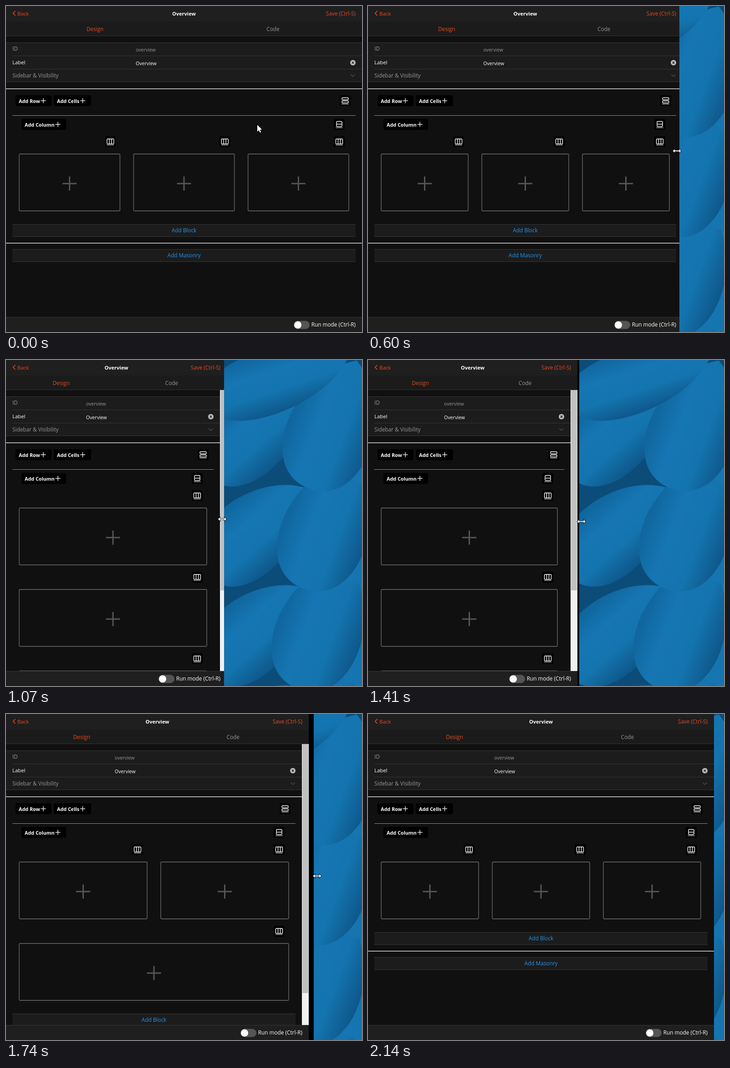
Recreate the animation shown at these times as an HTML page with a canvas. Size 782 by 716 pixels, loop 2.21 s.

```html
<!DOCTYPE html>
<html lang="en">
<head>
<meta charset="utf-8">
<title>Responsive layout editor</title>
<style>
html, body { margin: 0; width: 100%; height: 100%; overflow: hidden; background: #111; }
canvas { display: block; }
</style>
</head>
<body>
<canvas id="stage" width="782" height="716"></canvas>
<script>
const ctx = document.getElementById('stage').getContext('2d');
const LOOP = 2210, STEP = 67, WIDTH = 782, HEIGHT = 716;
const BODY_TOP = 66, BODY_BOTTOM = 683, ROW_PITCH = 179;
const MIN_PANEL = 450, END_PANEL = 760;
const ORANGE = '#e64a20', BLUE = '#2196f3', GREY = '#979797', BAR = '#1c1c1c', RULE = '#363636';

const clamp = v => Math.min(1, Math.max(0, v));
const smooth = v => (v = clamp(v)) * v * (3 - 2 * v);
const mix = (a, b, p) => a + (b - a) * p;

// The panel is dragged narrow at a nearly steady pace, rests, then eases wide again.
function panelWidth(step) {
  if (step > 20) return mix(MIN_PANEL, END_PANEL, smooth((step - 20) / 9.5));
  const drag = [[7, WIDTH], [9, 691], [16, 485], [17.3, 454], [19, MIN_PANEL]];
  return drag.slice(1).reduce((w, [end, to], i) => {
    const [start, from] = drag[i];
    return w + (to - from) * clamp((step - start) / (end - start));
  }, WIDTH);
}

function cursorAt(step) {
  const y = 356 - 95 * Math.exp(-((step / 9.4) ** 1.85));
  if (step < 7) return [mix(552, WIDTH, smooth(step / 7)), y];
  return [panelWidth(step + 0.42) + 25 * Math.max(0, step - 29.5), y];
}

function rect(x, y, w, h, color) {
  ctx.fillStyle = color;
  ctx.fillRect(x, y, w, h);
}

function text(str, x, y, color, { size = 11.8, weight = 400, align = 'left' } = {}) {
  ctx.font = `${weight} ${size}px "Open Sans", "Noto Sans", sans-serif`;
  ctx.textAlign = align;
  ctx.fillStyle = color;
  ctx.fillText(str, x, y);
}

function stroke(points, color, width = 1) {
  ctx.beginPath();
  points.forEach(([x, y]) => ctx.lineTo(x, y));
  ctx.strokeStyle = color;
  ctx.lineWidth = width;
  ctx.stroke();
}

function pill(x, y, w, h, r, color) {
  ctx.beginPath();
  ctx.roundRect(x, y, w, h, r);
  ctx.fillStyle = color;
  ctx.fill();
}

function frame(x, y, w, h, r, color, width) {
  ctx.beginPath();
  ctx.roundRect(x, y, w, h, r);
  ctx.strokeStyle = color;
  ctx.lineWidth = width;
  ctx.stroke();
}

function disc(x, y, r, color) {
  ctx.beginPath();
  ctx.arc(x, y, r, 0, 7);
  ctx.fillStyle = color;
  ctx.fill();
}

function plus(x, y, r, color, width) {
  rect(x - r, y - width / 2, r * 2, width, color);
  rect(x - width / 2, y - r, width, r * 2, color);
}

function feather(tipX, tipY, angle, length, width) {
  const side = width * 0.67;
  const fill = ctx.createLinearGradient(-width / 2, 0, width / 2, 0);
  ['#10659c', '#1676b3', '#1474ae', '#0e578a'].forEach((c, i) => fill.addColorStop(i / 3, c));
  ctx.save();
  ctx.translate(tipX, tipY);
  ctx.rotate(angle);
  ctx.beginPath();
  ctx.moveTo(0, -length);
  ctx.bezierCurveTo(side, -length * 0.75, side, 0, 0, 0);
  ctx.bezierCurveTo(-side, 0, -side, -length * 0.75, 0, -length);
  ctx.fillStyle = fill;
  ctx.fill();
  ctx.restore();
}

// Overlapping rows of soft feathers, the upper rows on top
function wallpaper() {
  rect(0, 0, WIDTH, HEIGHT, '#0c4c79');
  for (let row = 3; row >= 0; row--) {
    const y = 282 + 220 * row;
    feather(440, y - 30, 0.85, 290, 170);
    feather(785 - 10 * row, y - 10, 0.2, 270, 150);
    feather(665 - 12 * row, y, 0.36, 300, 190);
  }
  feather(440, 95, 1.25, 330, 140);
}

function iconBase(x, y) {
  pill(x - 12, y - 12, 24, 24, 4, '#000');
  rect(x - 8, y + 7, 16, 1, '#ddd');
}

function columnsIcon(x, y) {
  iconBase(x, y);
  frame(x - 7.5, y - 6, 15, 11, 1.5, '#fff', 1.4);
  for (const dx of [-2.5, 2.5]) stroke([[x + dx, y - 6], [x + dx, y + 5]], '#fff', 1.4);
}

function rowsIcon(x, y) {
  iconBase(x, y);
  for (const dy of [-6.5, 0.5]) frame(x - 7, y + dy, 14, 4.5, 1.5, '#fff', 1.4);
}

function cellIcon(x, y) {
  iconBase(x, y);
  frame(x - 6, y - 6.5, 12, 11.5, 2, '#fff', 1.4);
  stroke([[x - 6, y - 0.5], [x + 6, y - 0.5]], '#fff', 1.4);
}

function addButton(label, x, y, w, plusX) {
  pill(x, y, w, 24, 4, '#000');
  text(label, x + 7, y + 17, '#fff', { size: 10.8, weight: 700 });
  plus(plusX, y + 12, 5.5, '#eee', 1.4);
}

function linkBar(label, y, width) {
  rect(14, y, width - 28, 28, BAR);
  for (const dy of [0, 27]) rect(14, y + dy, width - 28, 1, RULE);
  text(label, width / 2, y + 18, BLUE, { align: 'center' });
}

function header(width) {
  rect(0, 0, width, 34, '#1f1f1f');
  rect(0, 34, width, 32, '#1b1b1b');
  rect(0, 65, width, 1, '#353535');
  stroke([[20.5, 11], [15.5, 16], [20.5, 21]], ORANGE, 1.6);
  text('Back', 25, 21, ORANGE, { size: 11.5 });
  text('Overview', width / 2, 21, '#fff', { size: 11, weight: 700, align: 'center' });
  text('Save (Ctrl-S)', width - 14, 21, ORANGE, { align: 'right' });
  text('Design', width / 4, 55, ORANGE, { align: 'center' });
  text('Code', width * 0.75, 55, GREY, { align: 'center' });
}

function settings(width) {
  const valueX = width * 0.35 + 11.3;
  rect(0, 80, width, 87, BAR);
  for (const y of [80, 166]) rect(0, y, width, 1, RULE);
  for (const y of [109, 138]) rect(14, y, width - 14, 1, RULE);
  text('ID', 14, 98, GREY);
  text('overview', valueX, 100, GREY, { size: 10.6 });
  text('Label', 14, 128, '#fff', { size: 11.4 });
  text('Overview', valueX, 129.5, '#fff', { size: 10.6 });
  text('Sidebar & Visibility', 14, 157, GREY);

  const x = width - 20;
  disc(x, 124.5, 6, '#bbb');
  for (const d of [-2.2, 2.2]) stroke([[x - d, 122.3], [x + d, 126.7]], '#222', 1.4);
  stroke([[x - 4.5, 150.5], [x, 155], [x + 4.5, 150.5]], '#555', 1.2);
}

function cell(x, y, w) {
  columnsIcon(x + w - 22, y - 26);
  frame(x + 1, y + 1, w - 2, 125, 2.5, '#565656', 1.8);
  plus(x + w / 2, y + 66, 15.5, '#565656', 3);
}

function editor(width, columns) {
  rect(0, 181, width, 1.5, '#dedede');
  addButton('Add Row', 21, 196, 79, 82);
  addButton('Add Cells', 105, 196, 82, 168.5);
  rowsIcon(width - 37, 208);
  rect(14, 240, width - 28, 1, '#929292');
  addButton('Add Column', 34, 248, 98, 114);
  cellIcon(width - 50, 260);

  for (let i = 0; i < 3; i++) {
    const row = Math.floor(i / columns);
    const inRow = Math.min(columns, 3 - row * columns);
    const w = (width - 28 * (inRow + 1)) / inRow;
    cell(28 + (i % columns) * (w + 28), 324 + row * ROW_PITCH, w);
  }

  const shift = (Math.ceil(3 / columns) - 1) * ROW_PITCH;
  linkBar('Add Block', 479 + shift, width);
  rect(0, 520 + shift, width, 1.5, '#dedede');
  linkBar('Add Masonry', 534 + shift, width);
}

function scrollbar(x, columns) {
  const thumbEnd = columns === 2 ? 613 : 506;
  rect(x, BODY_TOP, 15, BODY_BOTTOM - BODY_TOP, '#f1f1f1');
  rect(x + 1, BODY_TOP, 13, thumbEnd - BODY_TOP, '#c1c1c1');
}

function footer(width) {
  rect(0, BODY_BOTTOM, width, HEIGHT - BODY_BOTTOM, '#1f1f1f');
  rect(0, BODY_BOTTOM, width, 1, '#353535');
  pill(width - 150, 691.5, 35, 18, 9, '#555');
  disc(width - 141, 700.5, 8, '#fff');
  text('Run mode (Ctrl-R)', width - 14, 704, '#fff', { align: 'right' });
}

function pointer([x, y], resizing) {
  const half = [[-5, 1], [-5, 4], [-9, 0], [-5, -4], [-5, -1]];
  const shape = resizing
    ? [...half, ...half.map(([dx, dy]) => [-dx, -dy])]
    : [[0, 0], [0, 15], [3.4, 11.8], [5.8, 17], [8.2, 16], [5.8, 10.8], [10.5, 10.5]];
  ctx.beginPath();
  shape.forEach(([dx, dy]) => ctx.lineTo(x + dx, y + dy));
  ctx.closePath();
  ctx.strokeStyle = '#000';
  ctx.lineWidth = 1.6;
  ctx.stroke();
  ctx.fillStyle = '#fff';
  ctx.fill();
}

function draw(time) {
  const step = Math.min(32, Math.floor((time % LOOP + 4) / STEP));
  const width = Math.round(panelWidth(step));
  const edge = Math.round(panelWidth(step + 0.24)); // the window runs ahead of its content
  const columns = width >= 688 ? 3 : width >= 490 ? 2 : 1;
  const content = columns === 3 ? width : width - 15;

  wallpaper();
  ctx.save();
  ctx.beginPath();
  ctx.rect(0, 0, edge, HEIGHT);
  ctx.clip();
  rect(0, 0, edge, HEIGHT, '#000');
  rect(0, 0, width, HEIGHT, '#101010');
  settings(content);
  editor(content, columns);
  if (columns < 3) scrollbar(content, columns);
  header(width);
  footer(width);
  ctx.restore();

  pointer(cursorAt(step), step >= 6);
}

function tick(now) {
  draw(now);
  requestAnimationFrame(tick);
}
draw(0);
requestAnimationFrame(tick);
</script>
</body>
</html>
```
